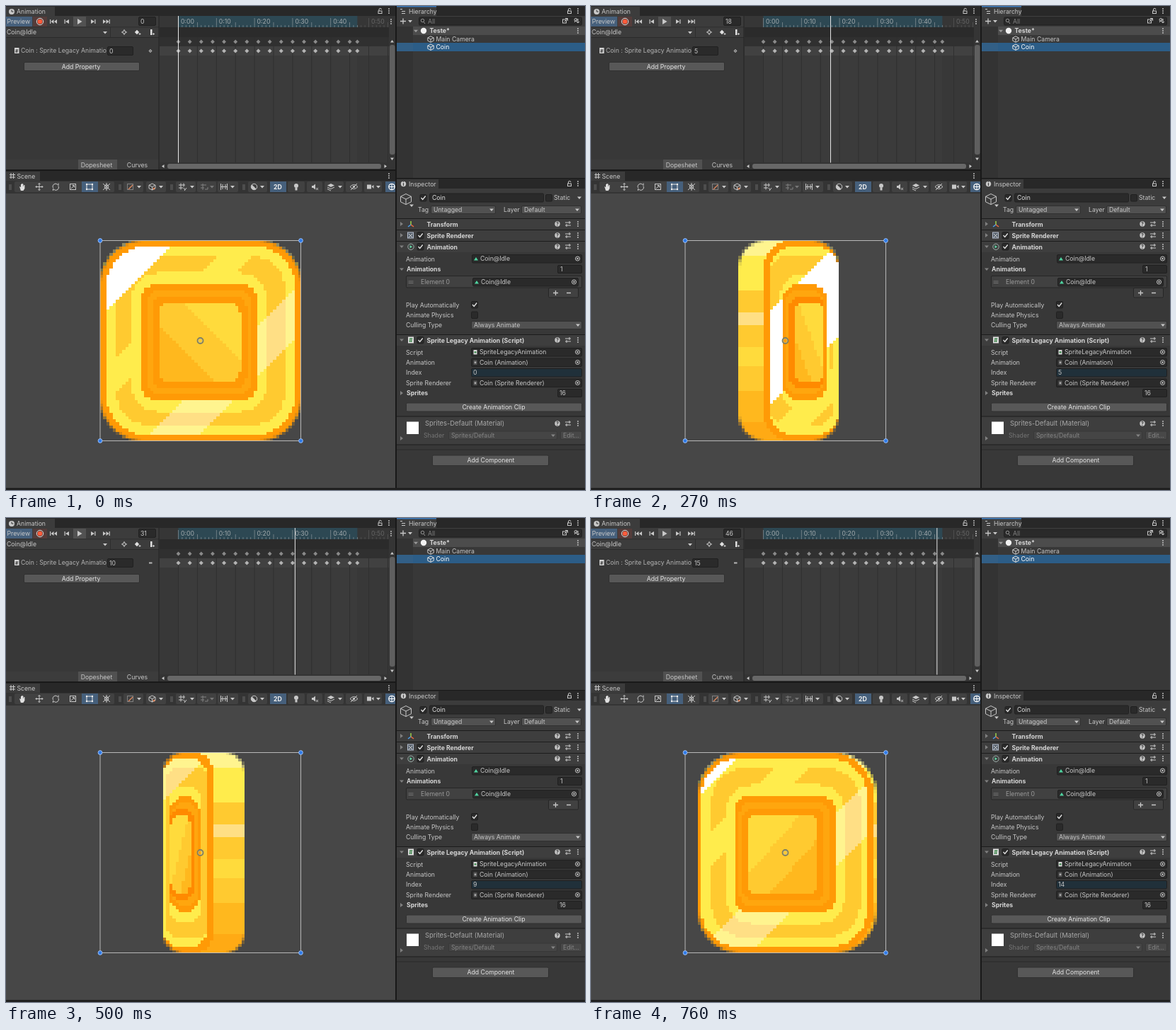
An HTML page with a canvas for the animation above (0.79 s loop, 818 by 684 pixels).

```html
<!DOCTYPE html>
<html lang="en">
<head>
<meta charset="utf-8">
<title>Coin animation editor</title>
<style>
html, body { margin: 0; width: 818px; height: 684px; overflow: hidden; background: #191919; }
svg { position: absolute; left: 0; top: 0; }
canvas { position: absolute; left: 133px; top: 331px; width: 283.5px; height: 283.5px; image-rendering: pixelated; }
text { font: 8.7px Inter, "Open Sans", sans-serif; white-space: pre; }
</style>
</head>
<body>
<svg id="ui" width="818" height="684"></svg>
<canvas id="coin" width="64" height="64"></canvas>
<svg id="over" width="818" height="684"></svg>
<script>
const LIGHT = '#c8c8c8', DIM = '#808080', FIELD = '#2a2a2a', BUTTON = '#585858', DARK = '#1c1c1c', BAR = '#3c3c3c';
const STEP = 5.38, ORIGIN = 243.5;
const frameX = f => ORIGIN + f * STEP;

let out = '';
const rect = (x, y, w, h, fill, extra = '') => out += `<rect x="${x}" y="${y}" width="${w}" height="${h}" fill="${fill}" ${extra}/>`;
const text = (x, y, s, fill = LIGHT, extra = '') => out += `<text x="${x}" y="${y}" fill="${fill}" ${extra}>${s}</text>`;
const bold = (x, y, s) => text(x, y, s, '#d6d6d6', 'style="font-weight:700"');
const mid = (x, y, s, fill) => text(x, y, s, fill, 'text-anchor="middle"');
const line = (d, c = LIGHT, w = 1) => out += `<path d="${d}" fill="none" stroke="${c}" stroke-width="${w}"/>`;
const fill = (d, c = LIGHT) => out += `<path d="${d}" fill="${c}"/>`;
const dot = (x, y, r, c = LIGHT, extra = '') => out += `<circle cx="${x}" cy="${y}" r="${r}" fill="${c}" ${extra}/>`;
const ring = (x, y, r, c = LIGHT, w = 1) => dot(x, y, r, 'none', `stroke="${c}" stroke-width="${w}"`);
const box = (x, y, w, h, c = FIELD, edge = '#202020') => rect(x + .5, y + .5, w - 1, h - 1, c, `rx="1.5" stroke="${edge}"`);
const down = (x, y, c = LIGHT) => fill(`M${x - 3} ${y - 1.5}h6l-3 3.5z`, c);
const right = (x, y, c = DIM) => fill(`M${x - 2} ${y - 3}v6l4 -3z`, c);
const diamond = (x, y, r, c) => fill(`M${x - r} ${y}l${r} ${-r}l${r} ${r}l${-r} ${r}z`, c);
const dots = (x, y) => { for (const d of [-3, 0, 3]) dot(x, y + d, .9); };
const lock = (x, y) => { rect(x - 2.5, y, 5, 3.5, 'none', `stroke="${LIGHT}"`); line(`M${x - 1.5} ${y}v-2a1.7 1.7 0 0 1 3.4 0`); };
const cube = (x, y, r, c = LIGHT) => line(`M${x} ${y - r}l${r} ${r / 2}v${r}l${-r} ${r / 2}l${-r} ${-r / 2}v${-r}zM${x - r} ${y - r / 2}l${r} ${r / 2}l${r} ${-r / 2}M${x} ${y}v${r}`, c);
const tab = (x, y, w, end, label, tx) => { rect(x, y, end - x, 14, '#282828'); rect(x, y + 1, w, 13, BAR); text(tx, y + 10.8, label); };
const check = (x, y, on) => { box(x, y, 10, 10.5); if (on) line(`M${x + 2} ${y + 5}l2.2 2.5l4 -5`, '#e4e4e4', 1.3); };
const drop = (x, y, w, label) => { box(x, y, w, 12, '#515151', '#303030'); text(x + 4, y + 9.2, label); down(x + w - 6, y + 6); };
const objectField = (x, y, w, label, kind) => {
  box(x, y, w, 12.5);
  if (kind === 'clip') fill(`M${x + 3} ${y + 8.5}l3 -4.5l3 4.5z`, '#4fd3a0');
  else { rect(x + 3.5, y + 3, 5, 6.5, kind === 'script' ? '#d8d8d8' : '#555'); dot(x + 6, y + 6.3, 1.4, kind === 'script' ? '#3d8a4c' : '#b0b0b0'); }
  text(x + 12, y + 9.4, label);
  ring(x + w - 6.5, y + 6, 3); dot(x + w - 6.5, y + 6, 1.2);
};
const header = (y, label, open, checked) => {
  rect(552, y, 266, 15, '#3e3e3e'); rect(552, y - 1, 266, 1, DARK);
  open ? down(559, y + 7, DIM) : right(559, y + 7);
  if (checked) check(580.5, y + 2, true);
  bold(594.5, y + 11, label);
  tools(y + 7);
};
const tools = y => {
  dot(779, y, 3.7); text(776.9, y + 2.6, '?', '#333', 'style="font-size:7px;font-weight:700"');
  line(`M790 ${y - 2}h8M790 ${y + 2}h8M796 ${y - 4}v4M792 ${y}v4`);
  dots(808, y);
};

function animationPanel() {
  rect(0, 0, 550, 231, '#383838');
  tab(0, 0, 69, 550, 'Animation', 15);
  dot(8, 8, 4); line('M8 5.5V8H10.5', '#333');
  lock(528.5, 7); dots(541, 7);
  rect(0, 14, 216, 16, BAR);
  rect(0, 15, 37, 14, '#46607c'); text(1.5, 25, 'Preview');
  rect(38, 15, 20, 14, '#543c3a'); ring(48, 22, 4.7, '#e8e0de'); dot(48, 22, 3.3, '#ff5c3c');
  rect(95, 15, 18, 14, '#525252');
  fill('M62 19h1.2v6H62zM67.5 19v6l-4-3zM72 19v6l-4-3zM82.5 19h1.2v6h-1.2zM89 19v6l-5-3z');
  fill('M101 18v8l6.5-4zM120 19v6l5-3zM125.3 19h1.2v6h-1.2zM137 19v6l4-3zM141.5 19v6l4-3zM145.6 19h1.2v6h-1.2z');
  box(187, 15, 25, 13);
  rect(0, 30, 216, 14, BAR); rect(0, 29.5, 216, .8, '#2b2b2b'); rect(0, 44, 216, 1, '#2b2b2b');
  text(1, 40.3, 'Coin@Idle'); down(140, 37.5);
  rect(147, 30, .8, 14, '#2b2b2b');
  ring(167, 37, 2.2); line('M167 33v2.5M167 38.5V41M163 37h2.5M168.5 37H171');
  diamond(185, 37, 3.2, '#e0e0e0'); line('M187.5 39.5h3M189 38v3');
  rect(204, 33, 2.5, 8, '#e0e0e0'); line('M207 39.5h3M208.500 38v3');
  rect(12, 59, 6.5, 8, '#d4d4d4'); text(13, 65.6, '#', '#333', 'style="font-size:6.5px;font-weight:700"');
  text(21, 66.3, 'Coin : Sprite Legacy Animatio', '#b4b4b4');
  box(143, 57, 37, 13);
  box(25, 79, 164, 13, BUTTON, '#303030'); mid(106, 88.7, 'Add Property', '#e4e4e4');
  rect(0, 217, 216, 14, BAR); rect(102, 217, 55, 14, '#515151');
  mid(128, 227.6, 'Dopesheet'); mid(185.500, 227.6, 'Curves');

  rect(217, 14, 324, 16, '#363636');
  rect(ORIGIN, 14, frameX(47) - ORIGIN, 16, '#2d4853');
  rect(217, 30, 324, 14, '#2b2b2b'); rect(217, 44, 324, 13, '#303030'); rect(217, 57, 324, 13, '#414141');
  rect(217, 70, 324, 151, '#383838'); rect(ORIGIN, 70, frameX(47) - ORIGIN, 151, '#3b3b3b');
  for (let f = 0; f <= 55; f++) {
    const x = frameX(f), tall = f % 10 === 0, med = f % 5 === 0, c = f > 47 ? '#555' : '#7d8a90';
    rect(x - .4, tall ? 17 : med ? 23 : 27, .8, tall ? 13 : med ? 7 : 3, c);
    if (med) rect(x - .5, 44, 1, 177, '#303030');
    if (tall) text(x + 3.5, 25, `0:${f || '00'}`, f > 47 ? '#666' : '#a4abae');
  }
  for (let i = 0; i <= 16; i++) {
    const x = frameX(Math.min(i * 3, 47));
    diamond(x, 50.5, 2.9, '#8a8a8a'); diamond(x, 63.5, 3, '#b4b4b4');
  }
  rect(541, 14, 9, 217, '#353535'); dots(544, 22);
  rect(542, 55, 7.5, 155, '#5f5f5f', 'rx="3"');
  fill('M543 51.5l2.500 -3.500l2.500 3.500zM543 214.500l2.500 3.500l2.500 -3.500z');
  rect(217, 221, 324, 10, '#343434'); rect(228, 223, 302, 7, '#686868', 'rx="3"');
  fill('M223.500 224v5l-3.500 -2.500zM534.500 224v5l3.500 -2.500z');
  rect(215.5, 14, 1, 217, '#222');
}

function scenePanel() {
  rect(0, 247, 550, 434, '#474747');
  tab(0, 233, 48, 550, 'Scene', 15.5);
  line('M7 236v8M10.500 236v8M5 238.500h8M5 242h8'); dots(541, 240);
  rect(0, 247, 550, 18, '#343434');
  for (const [x, w] of [[12, 141], [166, 28], [198, 28], [240, 28], [270, 27], [299, 29], [342, 27], [398, 24], [425, 22], [450, 27], [480, 23], [506, 25]])
    rect(x, 248, w, 15, '#414141', 'rx="2"');
  rect(107, 248, 23, 15, '#46607c'); rect(373, 248, 23, 15, '#46607c'); rect(536, 248, 14, 15, '#46607c');
  for (const x of [5, 160, 233, 335]) line(`M${x} 252v8M${x + 2} 252v8`, '#666');
  fill('M19 255l2 1v-4h1v3v-4h1.200v4v-3.500h1.200v4l1-2.500h1v5l-2 3h-3.500z', '#e0e0e0');
  line('M47 250.500v10M42 255.500h10M45.500 252l1.500-1.500 1.500 1.500M45.500 259l1.500 1.500 1.500-1.500M43.500 254l-1.500 1.500 1.500 1.500M50.500 254l1.500 1.500-1.500 1.500');
  line('M66.500 257a4 4 0 0 1 6-5l1.500 1.500v-3M74 254.500a4 4 0 0 1-6 5l-1.500-1.500v3');
  rect(90.5, 251.5, 8, 8, 'none', `stroke="${LIGHT}"`); line('M92 258l4-4M93.500 253.500H96.500V256.500');
  rect(114, 252, 8, 7, 'none', 'stroke="#e8e8e8"');
  for (const x of [114, 122]) for (const y of [252, 259]) dot(x, y, 1.2, '#eee');
  ring(142, 255.5, 2.8); line('M137 251l10 9M147 251l-10 9M142 250v11');
  rect(171.500, 251.500, 8, 8, 'none', `stroke="${DIM}"`); line('M173 259l6-6', '#e08a60', 1.3);
  cube(206.500, 255.500, 4.5); dot(209, 258, 1.5, '#e08a60');
  for (const x of [188, 219, 263, 320, 362, 472, 526]) down(x, 255.5);
  down(291, 255.5, '#777');
  line('M244 253h9M244 257h6M247 250.500v9M251 250.500v5M251 257l2 3M255 257l-3 4');
  line('M275 253h8M275 257h5M278 251v9M281 259h4v-3', '#808080');
  line('M303.500 251v9M312.500 251v9M306 252v7M310 252v7M303 255.500h10');
  ring(350.500, 255.500, 4.2); fill('M347.500 252.500a4.200 4.200 0 0 0 6 6z');
  text(378, 258.7, '2D', '#eee', 'style="font-weight:700"');
  dot(410, 254, 3); rect(408.500, 257, 3, 3.5, LIGHT);
  fill('M432 254h2l3-2.500v8l-3-2.500h-2z'); line('M438 257l3 3M441 257l-3 3');
  fill('M454 253.500l5-2.500 5 2.500-5 2.500z'); line('M454 256l5 2.500 5-2.500M454 258.500l5 2.500');
  line('M486 255.500q5.500-6 11 0q-5.500 6-11 0zM487 260l9-9'); dot(491.5, 255.5, 1.6);
  rect(510, 252.500, 6, 6, LIGHT); fill('M516.500 255l3-2v5z');
  ring(545, 255.5, 4.2, '#fff', 1.3); line('M541 255.500h8M545 251v9', '#fff');
}

function hierarchyPanel() {
  rect(552, 0, 266, 243, '#383838');
  tab(552, 0, 56, 818, 'Hierarchy', 569); rect(552, 0, 56, 1.5, '#3a79bb');
  line('M557 4.500h3M559 7.500h5M559 10.500h5'); lock(796, 7); dots(808, 7);
  rect(552, 14, 266, 15, BAR);
  line('M557 21.500h8M561 17.500v8', LIGHT, 1.3); down(571, 21.5);
  box(583, 15.5, 231, 12); ring(588.5, 20.5, 2.2, '#999'); line('M590 22.500l2 2.500', '#999'); text(596, 24.6, 'All', DIM);
  rect(786.5, 19, 5, 5, 'none', `stroke="${LIGHT}"`); line('M789 22l4-4M790 17.500h3.500v3.500');
  ring(805, 19.5, 2); line('M803 23l4-5M808 18v6M806 22l2 2 2-2');
  rect(552, 29, 23, 214, '#333'); rect(575, 29, 243, 12, '#4c4c4c');
  down(579, 35.2, '#999'); dot(590, 35, 4.2, '#f2f2f2'); bold(598.5, 38.2, 'Teste*'); dots(808, 35);
  rect(552, 52, 266, 12, '#2c5d87'); rect(552, 52, 23, 12, '#325f86');
  cube(600, 47, 4.2); cube(600, 58.2, 4.2, '#e0e0e0');
  text(607.5, 50, 'Main Camera'); text(607.5, 61.3, 'Coin', '#fff');
}

function inspectorPanel() {
  rect(552, 244, 266, 437, '#383838');
  tab(552, 244, 59, 818, 'Inspector', 569);
  dot(561.5, 251.5, 3.7); text(560.6, 254, 'i', '#333', 'style="font-size:7px;font-weight:700"');
  lock(796, 251); dots(808, 251);
  rect(552, 258, 266, 42, BAR);
  cube(565, 273, 7.5); down(573, 282);
  check(584.5, 266, true); box(598, 264.5, 162, 13); text(602, 274.3, 'Coin', '#e0e0e0');
  check(762, 266, false); text(774, 274.3, 'Static'); down(810, 271);
  text(582, 291.3, 'Tag'); drop(600, 282, 92, 'Untagged');
  text(703, 291.3, 'Layer'); drop(728, 282, 85, 'Default');

  header(301, 'Transform'); header(317, 'Sprite Renderer', false, true); header(333, 'Animation', true, true);
  line('M572 309v-5', '#9bd34c', 1.5); line('M572 309l-4 3', '#4ba0f0', 1.5); line('M572 309l4 3', '#f06a40', 1.5);
  rect(567.5, 320, 8, 8, '#56606c', 'stroke="#b8c0d0"'); line('M569 322l5 5M574 322l-5 5', '#e0e0e0');
  ring(572, 340.3, 4.2, '#9fb0ac'); fill('M570.500 338v4.500l3.500-2.200z', '#62d6a4');
  text(565, 360.8, 'Animation'); objectField(658, 351, 156, 'Coin@Idle', 'clip');
  down(559, 372, DIM); bold(566, 375.2, 'Animations'); box(779, 366, 35, 12); text(783, 375.2, '1');
  box(565, 381, 249, 17.5, '#414141', '#262626');
  line('M568.500 389h7M568.500 391.500h7', '#777'); text(586, 393.2, 'Element 0', '#9a9a9a');
  objectField(659, 384, 150, 'Coin@Idle', 'clip');
  box(766, 398, 43, 14.5, '#414141', '#262626'); line('M773 405.500h7M776.500 402v7M792 405.500h6', LIGHT, 1.3);
  text(565, 425.7, 'Play Automatically'); check(657, 417, true);
  text(565, 439.9, 'Animate Physics'); check(657, 431.5, false);
  text(565, 454, 'Culling Type'); drop(657, 445, 157, 'Always Animate');

  header(465, 'Sprite Legacy Animation (Script)', true, true);
  rect(568, 467.500, 8, 9, '#dcdcdc'); text(569.3, 475, '#', '#2f7d3e', 'style="font-size:8px;font-weight:700"');
  text(565, 492.5, 'Script'); objectField(657, 483, 157, 'SpriteLegacyAnimation', 'script');
  text(565, 506.8, 'Animation'); objectField(657, 497.5, 157, 'Coin (Animation)', 'ref');
  text(565, 521.2, 'Index'); box(657, 512, 157, 12.5, '#20303a');
  text(565, 535.6, 'Sprite Renderer'); objectField(657, 526.5, 157, 'Coin (Sprite Renderer)', 'ref');
  right(559, 547); bold(566, 550.2, 'Sprites'); box(779, 541, 35, 12); text(782, 550.2, '16');
  box(565, 560.5, 249, 13, BUTTON, '#303030'); mid(689, 570.2, 'Create Animation Clip', '#e4e4e4');

  rect(552, 580, 266, 40, '#3e3e3e'); rect(552, 579.5, 266, 1, DARK); rect(552, 619.5, 266, 1, DARK);
  rect(552, 626.5, 266, 1, '#2b2b2b');
  rect(566, 587.5, 17, 17.5, '#fff'); right(559, 611);
  text(592, 593.2, 'Sprites-Default (Material)', '#a8a8a8', 'style="font-size:9.4px"'); tools(590);
  text(590, 610.2, 'Shader', '#747474');
  box(625, 600.5, 154, 12.5, '#454545', '#383838'); text(629, 610, 'Sprites/Default', '#858585'); down(773, 607, '#858585');
  box(783, 600.5, 31, 12.5, '#484848', '#383838'); text(787, 610, 'Edit...', '#858585');
  box(602, 634.5, 165, 15.5, BUTTON, '#303030'); mid(685, 645.3, 'Add Component', '#e4e4e4');
}

animationPanel(); scenePanel(); hierarchyPanel(); inspectorPanel();
rect(0, 681, 818, 3, '#202020');
document.getElementById('ui').innerHTML = out;

out = '';
rect(133, 331.5, 283.5, 283, 'none', 'stroke="#c4c4c4" stroke-width=".9"');
for (const x of [133, 416.5]) for (const y of [331.5, 614.5]) dot(x, y, 2.9, '#2f7be8', 'stroke="#b8d4ff" stroke-width=".8"');
ring(274.5, 473, 4, '#7d7d62', 1.8); ring(274.5, 473, 2.8, '#b8b890', .7);
rect(-.5, 14, 1, 207.5, '#e6e6e6', 'id="head"');
text(190, 25, '0', LIGHT, 'id="frame"');
text(146, 66.5, '0', LIGHT, 'id="value"');
text(660, 521.3, '0', LIGHT, 'id="index"');
fill('', '#b8b8b8'); 
const over = document.getElementById('over');
over.innerHTML = out;
const mark = over.lastElementChild;
const [head, frameLabel, valueLabel, indexLabel] = ['head', 'frame', 'value', 'index'].map(id => document.getElementById(id));

// Coin, shaded on a 64 x 64 grid; turn 0..15 is a full spin
const LEFT = [0, 4, 7, 10, 14, 17, 20, 22, 24], RIGHT = [64, 61, 57, 54, 51, 49, 46, 43, 40], EDGE = [0, 1, 2, 4, 6, 8, 10, 13, 16];
const WHITE = 0xffffff, PALE = 0xfff48f, CREAM = 0xffdf85, YELLOW = 0xffec4c, GOLD = 0xffdb3c, AMBER = 0xffca30,
  HONEY = 0xffb81e, ORANGE = 0xff9a06, DEEP = 0xff8a00;
const BANDS = [[5, PALE], [16, YELLOW], [23, AMBER], [27, CREAM], [34, AMBER], [40, GOLD], [48, AMBER], [58, HONEY], [64, 0xffaa14]];

function cover(x, y, l, r, t, b, rad) {
  rad = Math.max(0.5, Math.min(rad, (r - l) / 2));
  return rad + .5 - Math.hypot(Math.max(l + rad - x, x - r + rad, 0), Math.max(t + rad - y, y - b + rad, 0));
}

function shade(turn, sx, y) {
  const back = turn > 8, n = back ? 16 - turn : turn, l = LEFT[n], r = RIGHT[n];
  const x = back ? l + r - sx : sx, rad = 13 * (1 - n * n / 64) + 1;
  const alpha = Math.min(1, cover(x, y, l, r, 0, 64, rad));
  if (alpha <= 0) return [0, 0];
  const from = l + EDGE[n], k = (r - from) / 64;
  const inside = (a, b, t, e, c, shift = 0) => cover(x, y, from + a * k + shift, from + b * k + shift, t, e, c) >= .5;
  if (n === 8) return [x < 26 || x > 38 ? ORANGE : BANDS.find(b => y < b[0])[1], alpha];
  if (!inside(0, 64, 0, 64, rad)) return [BANDS.find(b => y < b[0])[1], alpha];
  if (cover(x, y, from + 2, r - Math.max(0, 2 - n), 2, 62, rad - 1.5) < .5) return [ORANGE, alpha];

  const tilt = Math.min(n, 2) * .6;
  if (inside(13, 50, 14, 51, 5, tilt)) {
    const u = (x - from - tilt) / k - y;
    if (inside(19, 44.5, 20, 45, 3, tilt * 2)) return [u > 6 ? GOLD : u < -8 ? HONEY : AMBER, 1];
    if (inside(17, 46.5, 18, 47, 3, tilt * 1.7)) return [n > 1 ? DEEP : ORANGE, 1];
    return [inside(15, 48, 16, 49, 4, tilt) ? 0xffa60e : ORANGE, 1];
  }
  // Reflections sweep along 45 degree diagonals
  const s = sx + y, m = back ? turn - 16 : turn, lead = 25 + 7.2 * m + .75 * m * m;
  if (m > -3 && s < lead && s > lead - 30) return [WHITE, 1];
  const band = inside(5, 59, 5, 59, rad - 3) && !inside(10, 53, 10.5, 54.5, 8, tilt);
  const glow = 77 + 9.8 * m, soft = 42 + 9 * m;
  if (s > glow && s < glow + 17) return [band ? CREAM : PALE, 1];
  return [band && !(s > soft && s < soft + 12) ? AMBER : YELLOW, 1];
}

const ctx = document.getElementById('coin').getContext('2d');
function drawCoin(turn) {
  const img = ctx.createImageData(64, 64);
  for (let i = 0; i < 4096; i++) {
    const [c, a] = shade(turn, i % 64 + .5, (i >> 6) + .5);
    img.data.set([c >> 16, c >> 8 & 255, c & 255, a * 255], i * 4);
  }
  ctx.putImageData(img, 0, 0);
}

// Hold times in units of 10 ms, and playhead position against time
const HOLDS = [...'332323323332323232323252223233'].map(Number);
const PACE = [[0, 0], [160, 10.04], [270, 17.66], [420, 25.84], [570, 34.85], [680, 40.6], [760, 45.6], [790, 47]];
const TIMES = [];
HOLDS.reduce((t, d) => (TIMES.push(t), t + d * 10), 0);
// One long hold sits after 570 ms
for (let i = 0; i < TIMES.length; i++) TIMES[i] = Math.min(TIMES[i], 760);

function playhead(t) {
  const i = PACE.findIndex((p, j) => t >= p[0] && t < PACE[j + 1][0]);
  const [t0, p0] = PACE[i], [t1, p1] = PACE[i + 1];
  return p0 + (p1 - p0) * (t - t0) / (t1 - t0);
}

let shown = -1, coinTurn = -1;
function tick() {
  const now = performance.now() % 790;
  const start = TIMES.filter(t => t <= now).pop();
  if (start !== shown) {
    shown = start;
    const p = playhead(start), turn = Math.floor(p / 3), f = Math.round(p);
    head.setAttribute('x', frameX(p) - .5);
    frameLabel.textContent = f;
    valueLabel.textContent = turn;
    indexLabel.textContent = Math.floor(Math.max(0, p - 2.2) / 3);
    mark.setAttribute('d', f % 3 ? 'M202 62.500h4.500v2h-4.500z' : 'M201.500 63.500l2.500 -2.500l2.500 2.500l-2.500 2.500zM203 63.500l1 1l1 -1l-1 -1z');
    if (turn !== coinTurn) drawCoin(coinTurn = turn);
  }
  requestAnimationFrame(tick);
}
tick();
</script>
</body>
</html>
```
